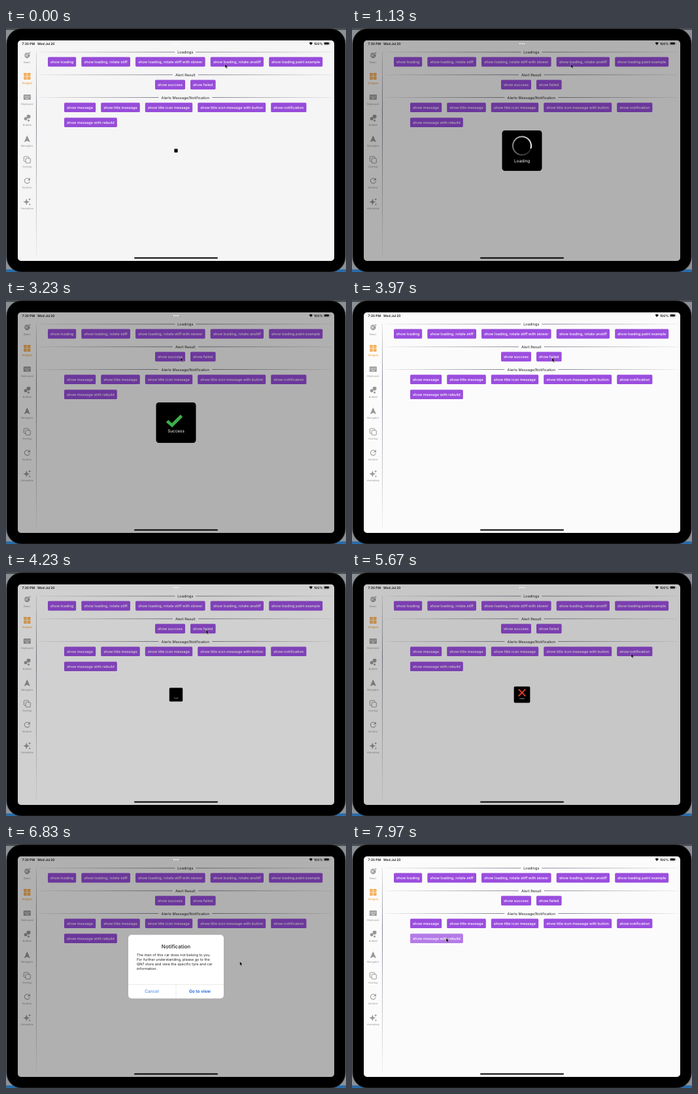
Recreate the animation shown at these times as an HTML page. Size 520 by 374 pixels, loop 8000 ms.

```html
<!DOCTYPE html>
<html lang="en">
<head>
<meta charset="utf-8">
<title>Dialog demo</title>
<style>
html, body { margin: 0; width: 100%; height: 100%; overflow: hidden; background: #000; }
svg { display: block; width: 100vw; height: 100vh; }
text { font-family: Inter, Roboto, sans-serif; text-rendering: geometricPrecision; }
</style>
</head>
<body>
<svg id="stage" viewBox="0 0 520 374">
  <defs>
    <linearGradient id="fadeL"><stop offset="0" stop-color="#667" stop-opacity=".1"/><stop offset="1" stop-color="#667"/></linearGradient>
    <linearGradient id="fadeR"><stop offset="0" stop-color="#667"/><stop offset="1" stop-color="#667" stop-opacity=".1"/></linearGradient>
    <linearGradient id="fadeV" x2="0" y2="1"><stop offset="0" stop-color="#778" stop-opacity=".2"/><stop offset=".3" stop-color="#778"/><stop offset="1" stop-color="#889" stop-opacity=".1"/></linearGradient>
    <clipPath id="screen"><rect x="18" y="19" width="484" height="338" rx="5"/></clipPath>
  </defs>
  <rect width="520" height="374" fill="#8b9096"/>
  <rect width="520" height="3" fill="#4a4d52"/>
  <rect y="370" width="520" height="4" fill="#2a6ca8"/>
  <rect x="1" y="1" width="518" height="373" rx="23" fill="#000" stroke="#2c2c2e"/>
  <g clip-path="url(#screen)">
    <rect x="18" y="19" width="484" height="338" fill="#fbfbfb"/>
    <g id="side"></g>
    <g id="page"></g>
    <rect id="dim" x="18" y="19" width="484" height="338"/>
    <g id="dialogs"></g>
  </g>
  <g id="status" font-size="4.9" font-weight="600" fill="#111">
    <text x="24.5" y="25.6">7:30 PM</text>
    <text x="48" y="25.6">Wed Jul 20</text>
    <text x="471" y="25.6">100%</text>
    <path d="M463.6 22.9Q466.3 20.7 469 22.9L466.3 26.2Z"/>
    <rect x="486" y="21.6" width="8.6" height="4.4" rx="1.3" fill="none" stroke="#777" stroke-width=".4"/>
    <rect x="486.7" y="22.3" width="7.2" height="3" rx=".8"/>
    <rect x="495" y="23" width=".6" height="1.6" fill="#777"/>
    <g fill="#fff"><circle cx="256.8" cy="24" r=".9"/><circle cx="260" cy="24" r=".9"/><circle cx="263.2" cy="24" r=".9"/></g>
    <rect x="196" y="351.5" width="128" height="2.1" rx="1" fill="#000"/>
  </g>
  <path id="cursor" d="M0 0V6.2L1.4 5L2.5 7.2L3.5 6.7L2.5 4.6H4.4Z" fill="#000" stroke="#fff" stroke-width=".35"/>
</svg>
<script>
const LOOP = 8000, FADE = 200;
const NS = 'http://www.w3.org/2000/svg';
const $ = id => document.getElementById(id);

function add(parent, tag, attrs, content) {
  const el = document.createElementNS(NS, tag);
  for (const k in attrs) el.setAttribute(k, attrs[k]);
  if (content !== undefined) el.textContent = content;
  parent.appendChild(el);
  return el;
}
const label = (parent, x, y, size, fill, str, more) =>
  add(parent, 'text', { x, y, 'font-size': size, fill, 'text-anchor': 'middle', ...more }, str);

// Sidebar: icons are drawn around their own centre
const items = [
  ['Basic', '<circle r="4.2"/><path d="M-4 -3L3 4M-3 3L4 -4M-4 0H0M0 -4V0" stroke="#fbfbfb" stroke-width=".7"/><circle cx="4" cy="-4" r="1"/>'],
  ['Widgets', '<path d="M-5 -5H-.6V-.6H-5ZM-5 .6H-.6V5H-5ZM.6 .6H5V5H.6ZM.6 -5H5V-.6H.6Z"/><path d="M-3.8 -3.8h2v2h-2zM-3.8 1.8h2v2h-2zM1.8 1.8h2v2h-2zM1.8 -3.8h2v2h-2z" fill="#fbd9ad"/>'],
  ['Keyboard', '<rect x="-5.5" y="-4" width="11" height="8" rx="1"/><path d="M-4 -1.8H4M-4 0H4" stroke="#fbfbfb" stroke-width=".9" stroke-dasharray="1 .75"/><path d="M-2.4 2.2H2.4" stroke="#fbfbfb" stroke-width=".9"/>'],
  ['Bubble', '<circle cx="-2.2" cy="1" r="2.5"/><circle cx="2.2" cy="-2.3" r="3"/><circle cx="2.2" cy="3.7" r="1.5"/>'],
  ['Navigator', '<path d="M0 -5.5L4.6 5L0 3L-4.6 5Z"/>'],
  ['Overlay', '<rect x="-5" y="-5" width="7.5" height="7.5" rx="1" fill="none" stroke="#999"/><rect x="-2.2" y="-2.2" width="7.2" height="7.2" rx="1" fill="#fbfbfb" stroke="#999"/>'],
  ['Brother', '<path d="M3.2 -2.3A4 4 0 1 0 4 1" fill="none" stroke="#999" stroke-width="1.1"/><path d="M4.6 -4.6V-.5H.5Z"/>'],
  ['Homeless', '<path d="M-1 -4.5L.3 -.7L4 .6L.3 1.9L-1 5.6L-2.3 1.9L-6 .6L-2.3 -.7ZM3.8 -5.6L4.4 -4L6 -3.4L4.4 -2.8L3.8 -1.2L3.2 -2.8L1.6 -3.4L3.2 -4ZM4 2.6L4.5 3.9L5.8 4.4L4.5 4.9L4 6.2L3.5 4.9L2.2 4.4L3.5 3.9Z"/>']
];
items.forEach(([name, icon], i) => {
  const fill = i === 1 ? '#f29a2e' : '#999', y = 42 + i * 32;
  add($('side'), 'g', { transform: `translate(32.3 ${y})`, fill }).innerHTML = icon;
  label($('side'), 32.3, y + 11.5, 4.05, fill, name);
});
add($('side'), 'rect', { x: 46, y: 36, width: .9, height: 314, fill: 'url(#fadeV)' });

// Page: section titles and buttons
const page = $('page');
function section(y, title, gap) {
  const c = 274.3;
  add(page, 'rect', { x: 51, y: y - .4, width: c - gap - 51, height: .8, fill: 'url(#fadeL)' });
  add(page, 'rect', { x: c + gap, y: y - .4, width: 498 - c - gap, height: .8, fill: 'url(#fadeR)' });
  label(page, c, y + 2, 5.6, '#222', title);
}
section(37, 'Loadings', 16);
section(71.8, 'Alert Result', 19.5);
section(106.5, 'Alerts Message/Notification', 41);

const glows = {};
function button(x, right, y, str) {
  const box = { x, y, width: right - x, height: 14.6, rx: 1.6 };
  add(page, 'rect', { ...box, fill: '#9b4ede' });
  label(page, (x + right) / 2, y + 9.2, 5.6, '#fff', str, { 'font-weight': 500 });
  glows[str] = add(page, 'rect', { ...box, fill: '#fff', opacity: 0 });
}
button(64, 107.2, 44.6, 'show loading');
button(115.3, 190, 44.6, 'show loading, rotate stiff');
button(198, 304.6, 44.6, 'show loading, rotate stiff with slower');
button(312.7, 394, 44.6, 'show loading, rotate unstiff');
button(402.2, 484.2, 44.6, 'show loading paint example');
button(228, 274, 79.6, 'show success');
button(282, 320.6, 79.6, 'show failed');
button(89, 137.2, 114.4, 'show message');
button(145.2, 204.8, 114.4, 'show title message');
button(212.8, 285.2, 114.4, 'show title icon message');
button(293.2, 397.2, 114.4, 'show title icon message with button');
button(405.2, 459.4, 114.4, 'show notification');
button(89, 169.8, 137.5, 'show message with rebuild');

// Dialogs, centred on 0,0
function dialog(open, close) {
  return { open, close, g: add($('dialogs'), 'g', {}) };
}
function toast(open, close, str) {
  const d = dialog(open, close);
  add(d.g, 'rect', { x: -30.5, y: -31, width: 61, height: 62, rx: 4.5, fill: '#000' });
  d.icon = add(d.g, 'g', { transform: 'translate(0 -7.5)', fill: 'none' });
  label(d.g, 0, str === 'Success' ? 14.9 : 18, 6.4, '#fff', str);
  return d;
}
const stroke = (d, path, color, from, width) =>
  ({ el: add(d.icon, 'path', { d: path, stroke: color, 'stroke-width': width, pathLength: 1, 'stroke-dasharray': '1 2' }), from });

const loading = toast(-16, 2480, 'Loading');
loading.spin = add(loading.icon, 'g', {});
const SEGS = 24;
for (let i = 0; i < SEGS; i++) {
  const p = a => `${14 * Math.cos(a)} ${14 * Math.sin(a)}`, step = 2 * Math.PI / SEGS;
  add(loading.spin, 'path', {
    d: `M${p(i * step)}A14 14 0 0 1 ${p((i + 1.05) * step)}`,
    stroke: '#fff', 'stroke-width': 2, opacity: .12 + .88 * i / SEGS
  });
}
const success = toast(2880, 3760, 'Success');
success.lines = [stroke(success, 'M-13.5 5.2L-6 11.5L8.5 -3', '#3fae49', 90, 4.8)];
const failed = toast(4164, 5552, 'Failed');
failed.lines = [
  stroke(failed, 'M-13 -13L13 13', '#e23b32', 90, 4.6),
  stroke(failed, 'M13 -13L-13 13', '#e23b32', 190, 4.6)
];

const notice = dialog(5950, 7490);
add(notice.g, 'rect', { x: -73, y: -48.7, width: 146, height: 97.4, rx: 5, fill: '#fff' });
label(notice.g, 0, -28, 8, '#222', 'Notification', { 'font-weight': 500 });
['The man of this car does not belong to you.',
 'For further understanding, please go to the',
 'QN7 store and view the specific tyre and car',
 'information.'].forEach((s, i) =>
  label(notice.g, -60, -15.6 + 6.9 * i, 5.5, '#222', s, { 'text-anchor': 'start' }));
add(notice.g, 'path', { d: 'M-73 27.5H73M0 27.5V48.7', stroke: '#ddd', 'stroke-width': .6 });
label(notice.g, -37, 40.4, 6.6, '#3b7de0', 'Cancel');
label(notice.g, 36.5, 40.4, 6.5, '#2f6fdc', 'Go to view', { 'font-weight': 700 });

const dialogs = [loading, success, failed, notice];
const presses = [
  ['show success', 2770, 2870], ['show failed', 4050, 4150],
  ['show notification', 5840, 5940], ['show message with rebuild', 7895, 8100]
];
const path = [
  [0, 335, 55], [1100, 335, 55], [2200, 267, 88], [3330, 267, 88], [3700, 306, 88.5],
  [4700, 306, 88.5], [5450, 427, 125], [6300, 427, 125], [6800, 357.5, 180],
  [6950, 357.5, 180], [7450, 144, 144], [8000, 144, 144]
];

const clamp = v => Math.min(1, Math.max(0, v));
const smooth = v => v * v * (3 - 2 * v);

// cubic-bezier(.25, .1, .25, 1)
function ease(x) {
  if (x <= 0 || x >= 1) return clamp(x);
  const bez = (a, b, s) => 3 * a * s * (1 - s) ** 2 + 3 * b * s * s * (1 - s) + s ** 3;
  let lo = 0, hi = 1;
  for (let i = 0; i < 20; i++) {
    const mid = (lo + hi) / 2;
    if (bez(.25, .25, mid) < x) lo = mid; else hi = mid;
  }
  return bez(.1, 1, lo);
}

function draw(t) {
  let shade = 0;
  for (const d of dialogs) {
    const p = Math.min(clamp((t - d.open) / FADE), clamp(1 - (t - d.close) / FADE));
    shade = Math.max(shade, p);
    d.g.setAttribute('display', p > 0 ? 'inline' : 'none');
    d.g.setAttribute('transform', `translate(260 188) scale(${p})`);
    for (const { el, from } of d.lines || []) {
      const drawn = clamp((t - d.open - from) / 160);
      el.setAttribute('stroke-dashoffset', 1 - drawn);
      el.setAttribute('display', drawn > 0 ? 'inline' : 'none');
    }
  }
  $('dim').setAttribute('opacity', .3 * ease(shade));

  const turn = t / 1000;
  const angle = 360 * (Math.floor(turn) + smooth(turn % 1));
  loading.spin.setAttribute('transform', `rotate(${angle})`);

  for (const [name, from, to] of presses) {
    const glow = Math.min(clamp((t - from) / 60), clamp((to + 60 - t) / 60));
    glows[name].setAttribute('opacity', .25 * glow);
  }

  const i = Math.max(1, path.findIndex(k => k[0] > t));
  const [t0, x0, y0] = path[i - 1], [t1, x1, y1] = path[i];
  const k = smooth(clamp((t - t0) / (t1 - t0)));
  $('cursor').setAttribute('transform', `translate(${x0 + (x1 - x0) * k} ${y0 + (y1 - y0) * k})`);
}

const start = performance.now();
function tick() {
  draw((performance.now() - start) % LOOP);
  requestAnimationFrame(tick);
}
tick();
</script>
</body>
</html>
```
